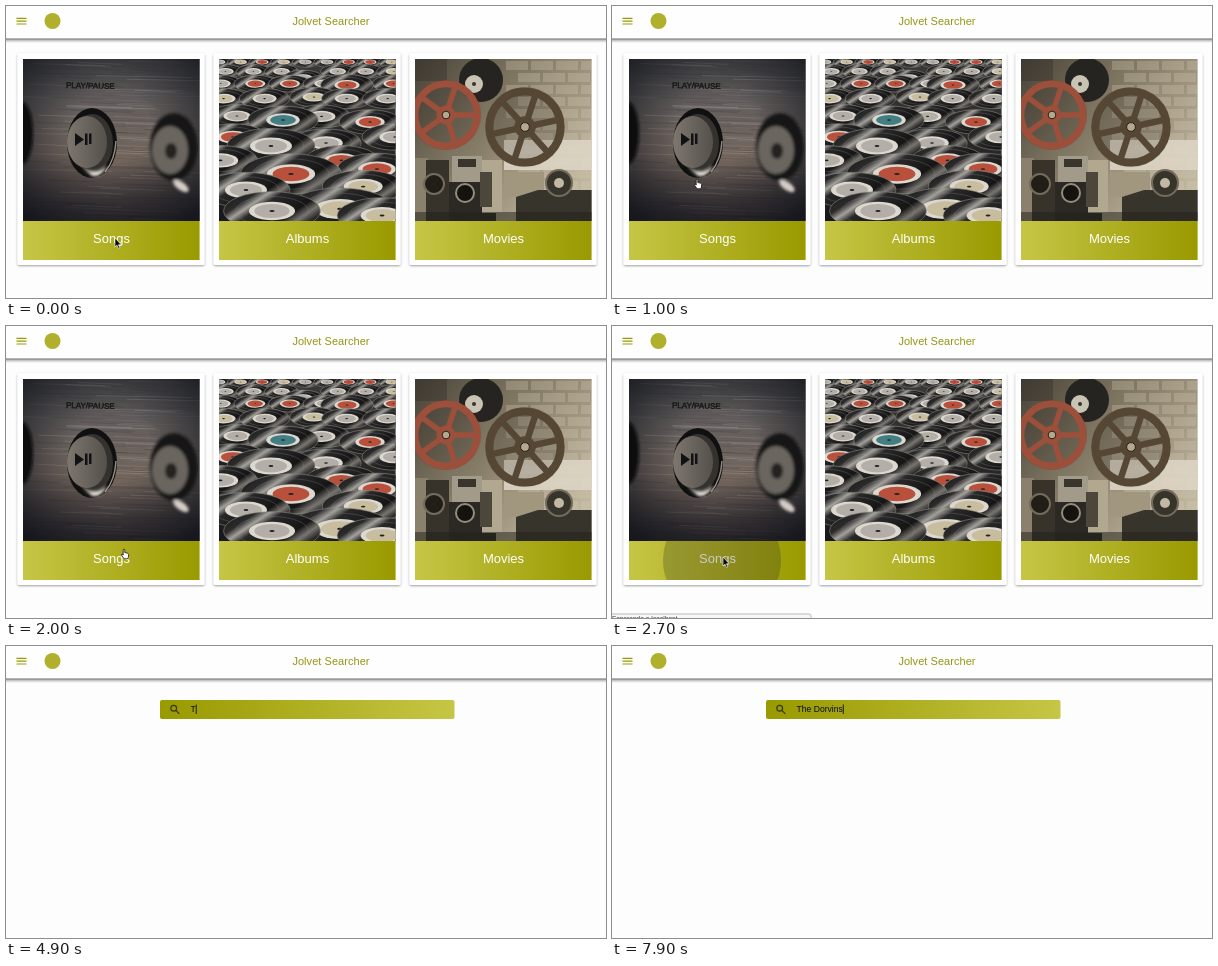
Animation of 600 by 292 pixels, one loop 8 s. Source, as an HTML page:

```html
<!DOCTYPE html>
<html lang="en">
<head>
<meta charset="utf-8">
<title>Media search</title>
<style>
html, body { margin: 0; width: 100%; height: 100%; overflow: hidden; background: #fdfdfd; }
svg { font-family: "Liberation Sans", Arial, sans-serif; }
#stage { display: block; width: 100vw; height: 100vh; }
</style>
</head>
<body>
<svg id="stage" viewBox="0 0 600 292">
  <defs>
    <linearGradient id="button"><stop stop-color="#c6c646"/><stop offset="1" stop-color="#999900"/></linearGradient>
    <linearGradient id="bar"><stop stop-color="#999900"/><stop offset="1" stop-color="#c6c646"/></linearGradient>
    <linearGradient id="drop" x2="0" y2="1"><stop stop-color="#c4c4c4"/><stop offset=".28" stop-color="#969696"/><stop offset=".55" stop-color="#d0d0d0"/><stop offset="1" stop-color="#fdfdfd"/></linearGradient>
    <linearGradient id="metal" x2="0" y2="1"><stop stop-color="#4b4a4c"/><stop offset=".25" stop-color="#625d5c"/><stop offset=".6" stop-color="#75685f"/><stop offset="1" stop-color="#41383a"/></linearGradient>
    <radialGradient id="vignette" cx=".5" cy=".42" r=".72"><stop offset=".3" stop-color="#11141b" stop-opacity="0"/><stop offset="1" stop-color="#11141b" stop-opacity=".9"/></radialGradient>
    <linearGradient id="knob"><stop stop-color="#7d776f"/><stop offset="1" stop-color="#55504a"/></linearGradient>
    <linearGradient id="floor" x2="0" y2="1"><stop stop-color="#3c3a37"/><stop offset="1" stop-color="#191919"/></linearGradient>
    <linearGradient id="disc" x2="1" y2=".6"><stop stop-color="#151515"/><stop offset=".26" stop-color="#2b2b2b"/><stop offset=".36" stop-color="#a5a29c"/><stop offset=".46" stop-color="#282828"/><stop offset=".76" stop-color="#151515"/><stop offset=".88" stop-color="#77746f"/><stop offset="1" stop-color="#202020"/></linearGradient>
    <linearGradient id="wall" x2="1" y2=".7"><stop stop-color="#484338"/><stop offset=".4" stop-color="#7b725f"/><stop offset="1" stop-color="#c0b59d"/></linearGradient>
    <filter id="soft"><feGaussianBlur stdDeviation="1.6"/></filter>
    <filter id="shade" x="-10%" y="-10%" width="120%" height="120%"><feDropShadow dx="0" dy="1" stdDeviation="1.1" flood-opacity=".38"/></filter>
    <clipPath id="songsButton"><path d="M17 215H193.600V254H17Z"/></clipPath>
  </defs>
  <rect width="600" height="292" fill="#fdfdfd"/>

  <g id="home">
    <g id="cards"></g>
    <svg x="17" y="53" width="176.600" height="162" viewBox="17 53 176.600 162">
      <path d="M17 53H194V215H17Z" fill="url(#metal)"/>
      <g id="brushed" stroke-width="1"></g>
      <path d="M17 53H194V215H17Z" fill="url(#vignette)"/>
      <g filter="url(#soft)">
        <ellipse cx="16" cy="127" rx="11" ry="31" fill="#0b0b0c"/>
        <ellipse cx="168" cy="141" rx="24" ry="34" fill="#151415"/>
        <ellipse cx="164" cy="144" rx="18" ry="24" fill="#6a655f"/>
        <ellipse cx="165" cy="145" rx="6" ry="8" fill="#262423"/>
        <ellipse cx="175" cy="180" rx="9" ry="4" fill="#d5cec7" transform="rotate(35 175 180)"/>
      </g>
      <ellipse cx="86" cy="137" rx="25" ry="35" fill="#111011"/>
      <path d="M99 166Q109 154 110 135" fill="none" stroke="#8e8780" stroke-width="1.500"/>
      <ellipse cx="86" cy="137" rx="21" ry="29" fill="#35312e"/>
      <ellipse cx="81" cy="136" rx="20" ry="26" fill="url(#knob)"/>
      <path d="M77 162Q90 170 101 159Q96 172 86 170Z" fill="#e0dad2" filter="url(#soft)"/>
      <path d="M69 127L78 133.500 69 140ZM79 127.500H81.500V139H79ZM83 127.500H85.500V138H83Z" fill="#121212"/>
      <text x="60" y="82" font-size="8" fill="#171717" stroke="#171717" stroke-width=".4" transform="rotate(1 60 82)">PLAY/PAUSE</text>
    </svg>
    <svg x="213" y="53" width="176.600" height="162" viewBox="213 53 176.600 162">
      <path d="M213 53H390V215H213Z" fill="url(#floor)"/>
      <g id="records"></g>
    </svg>
    <svg x="409" y="53" width="176.600" height="162" viewBox="409 53 176.600 162">
      <path d="M409 53H586V215H409Z" fill="url(#wall)"/>
      <g id="bricks" fill="#d3c9b4" opacity=".3"></g>
      <path d="M498 134H586V164H498Z" fill="#e0d8c8" opacity=".85"/>
      <path d="M409 53H441V75H409Z" fill="#322f28" opacity=".4"/>
      <circle cx="475" cy="74" r="22" fill="#252420"/>
      <circle cx="468" cy="78" r="9" fill="#c9c3b4"/>
      <circle cx="468" cy="78" r="2" fill="#37342d"/>
      <g id="reels" fill="none"></g>
      <path d="M409 152H422V215H409Z" fill="#8a806c"/>
      <path d="M420 154H443V215H420Z" fill="#37332b"/>
      <path d="M446 150H476V178H446Z" fill="#a39b89"/>
      <path d="M452 153H470V161H452Z" fill="#3a352c"/>
      <path d="M443 176H490V215H443Z" fill="#2b2924"/>
      <path d="M476 154H496V207H476Z" fill="#b2a78f"/>
      <path d="M474 166H486V201H474Z" fill="#4d473b"/>
      <circle cx="459" cy="187" r="9" fill="#14130f" stroke="#958d7b" stroke-width="2"/>
      <circle cx="428" cy="178" r="10" fill="#211e18" stroke="#746c5b" stroke-width="2"/>
      <path d="M498 166H538V191H498Z" fill="#a1967e"/>
      <path d="M510 191L532 184H586V215H510Z" fill="#37342c"/>
      <circle cx="553" cy="177" r="13" fill="#37342c" stroke="#746b5a" stroke-width="2"/>
      <circle cx="553" cy="177" r="5" fill="#c2b8a3"/>
      <path d="M409 206H586V215H409Z" fill="#23201a" opacity=".5"/>
    </svg>
    <circle id="ripple" cx="110" cy="234" fill="#222" opacity=".23" clip-path="url(#songsButton)"/>
    <g id="status">
      <path d="M-1 288H197Q199 288 199 290V293H-1Z" fill="#f7f7f7" stroke="#aaa" stroke-width=".8"/>
      <text x="0" y="295" font-size="6.600" fill="#444">Esperando a localhost…</text>
    </g>
  </g>

  <g id="search">
    <rect x="154" y="54" width="294.500" height="19" rx="2" fill="url(#bar)"/>
    <g fill="none" stroke="#38380c" stroke-width="1.200">
      <circle cx="167.700" cy="62.200" r="2.900"/>
      <path d="M169.900 64.400L173.300 67.800"/>
    </g>
    <text id="query" x="184.500" y="66.200" font-size="8.600" xml:space="preserve"></text>
    <path id="caret" d="M0 58.500V68" stroke="#111" stroke-width=".9"/>
  </g>

  <rect y="32" width="600" height="5" fill="url(#drop)"/>
  <rect width="600" height="32" fill="#fefefe"/>
  <path d="M10.500 12.300H20.500M10.500 15.200H20.500M10.500 18H20.500" stroke="#999900" stroke-width="1.200"/>
  <circle cx="46.500" cy="15" r="8" fill="#b0b02c"/>
  <text x="325" y="18.600" font-size="11" text-anchor="middle" fill="#999513" letter-spacing=".05">Jolvet Searcher</text>

  <g id="cursor">
    <path id="arrow" d="M0 0V9L2 7.200 3.400 10.400 4.800 9.800 3.400 6.700H6.200Z" fill="#080808" stroke="#fff" stroke-width=".6"/>
    <path id="hand" d="M-.8 4.800V1.200Q-.8 .2 0 .2T.8 1.200V3.600Q4.800 3.800 4.600 5.400V7Q4.400 8.600 3.600 9.800H.2Q-.8 8.400 -2.400 6.200Q-2.800 5 -1.800 5.200L-.8 6Z" fill="#fff" stroke="#111" stroke-width=".8"/>
    <path id="beam" d="M-1.500 -4.500Q0 -4.500 0 -3.500Q0 -4.500 1.500 -4.500M0 -3.500V3.500M-1.500 4.500Q0 4.500 0 3.500Q0 4.500 1.500 4.500" fill="none" stroke="#111" stroke-width=".7"/>
  </g>
</svg>
<script>
const LOOP = 8000, STEP = 100;
const CLICK = 2500, PAGE_CHANGE = 3000, FOCUS = 4300;
const QUERY = "The Dorvins";
const KEY_TIMES = [4900, 5150, 5350, 5600, 6000, 6450, 6700, 6950, 7150, 7350, 7600];
const PATH = [
  [0, 109, 232], [250, 109, 230], [1000, 85, 173], [1300, 86, 176],
  [2000, 118, 223], [2400, 111, 231], [3300, 111, 231],
  [3600, 168, 144], [3700, 200.5, 88], [3900, 226, 63], [LOOP, 226, 63]
];
const $ = id => document.getElementById(id);
const show = (id, on) => $(id).setAttribute("display", on ? "inline" : "none");

function seeded(seed) {
  return () => (seed = (seed * 16807) % 2147483647) / 2147483647;
}

function buildCards() {
  $("cards").innerHTML = ["Songs", "Albums", "Movies"].map((name, i) => `
    <g transform="translate(${i * 196})">
      <rect x="11.5" y="47" width="187" height="212" rx="2" fill="#fff" filter="url(#shade)"/>
      <rect x="17" y="215" width="176.600" height="39" fill="url(#button)"/>
      <text x="105.500" y="237" font-size="13" text-anchor="middle" fill="#fff">${name}</text>
    </g>`).join("");
}

function buildBrushed() {
  const random = seeded(11);
  let lines = "";
  for (let y = 54; y < 215; y += 1.2) {
    const x = 10 + random() * 130, tone = random() < .5 ? "#fff" : "#000";
    lines += `<path d="M${x} ${y}l${30 + random() * 70} 2" stroke="${tone}" opacity="${random() * .16}"/>`;
  }
  $("brushed").innerHTML = lines;
}

function record(x, y, r, color) {
  const ring = (scale, attrs) =>
    `<ellipse cx="${x}" cy="${y}" rx="${r * scale}" ry="${r * scale * .4}" ${attrs}/>`;
  return ring(2.2, 'fill="url(#disc)" stroke="#8c8982" stroke-width=".6"') +
    ring(1.65, 'fill="none" stroke="#888" stroke-width=".3"') +
    ring(1.05, 'fill="#dcd8d0"') + ring(.8, `fill="${color}"`) + ring(.12, 'fill="#222"');
}

function buildRecords() {
  const red = "#b9503c", teal = "#417f85", cream = "#c9bda0", gray = "#b3afa8";
  const labels = [
    [297, 72, 9, gray], [341, 79, 12, red], [308, 91, 11, cream], [364, 116, 14, red],
    [277, 114, 16, teal], [265, 140, 20, gray], [320, 137, 16, gray], [285, 168, 23, red],
    [371, 163, 18, red], [240, 184, 20, gray], [334, 203, 24, cream], [231, 110, 13, gray],
    [266, 205, 22, gray]
  ];
  const random = seeded(23), tones = [gray, cream, red, gray];
  for (let row = 0; row < 9; row++) {
    const y = 56 + row * 8 + row * row * 1.4, r = 6 + row * 1.8;
    for (let x = 213 + random() * r; x < 400; x += r * 3.6) {
      const clear = labels.every(p => Math.hypot(p[0] - x, (p[1] - y) * 2) > p[2] * 1.8);
      if (clear) labels.push([x, y, r, tones[Math.floor(random() * 4)]]);
    }
  }
  labels.sort((a, b) => a[1] - b[1]);
  $("records").innerHTML = labels.map(p => record(...p)).join("");
}

function reel(x, y, r, color, spokes) {
  let arms = "";
  for (let i = 0; i < spokes; i++) {
    arms += `<path transform="rotate(${i * 360 / spokes + 18})" d="M0 0V${-r * .88}" stroke-width="${r * .16}"/>`;
  }
  return `<g transform="translate(${x} ${y})" stroke="${color}">
    <circle r="${r}" fill="#1e1a14" fill-opacity=".18" stroke="none"/>
    <circle r="${r * .89}" stroke-width="${r * .2}"/>${arms}
    <circle r="${r * .26}" fill="${color}"/>
    <circle r="${r * .11}" fill="#b4a88f" stroke="#26231d"/></g>`;
}

function buildProjector() {
  let bricks = "";
  for (let row = 0; row < 11; row++)
    for (let x = 500 + row % 2 * 12; x < 586; x += 25)
      bricks += `<rect x="${x}" y="${55 + row * 12}" width="22" height="9"/>`;
  $("bricks").innerHTML = bricks;
  $("reels").innerHTML = reel(440, 109, 35, "#9c4f3a", 5) + reel(519, 121, 40, "#554733", 6);
}

function cursorAt(t) {
  const i = PATH.findIndex(p => p[0] > t);
  const [t0, x0, y0] = PATH[i - 1], [t1, x1, y1] = PATH[i];
  const k = (t - t0) / (t1 - t0);
  return [x0 + (x1 - x0) * k, y0 + (y1 - y0) * k];
}

function drawCursor(t) {
  const [x, y] = cursorAt(t);
  $("cursor").setAttribute("transform", `translate(${x} ${y})`);
  const hand = t >= 200 && t < 2400, beam = t >= 3900;
  show("hand", hand);
  show("beam", beam);
  show("arrow", !hand && !beam);
  show("cursor", t < KEY_TIMES[0]);
}

function drawSearch(t) {
  const count = KEY_TIMES.filter(time => time <= t).length;
  const query = $("query");
  query.textContent = count ? QUERY.slice(0, count) : "Search…";
  query.setAttribute("fill", count ? "#080808" : "#55550f");
  const width = count ? query.getComputedTextLength() : 0;
  const lastInput = count ? KEY_TIMES[count - 1] : FOCUS;
  $("caret").setAttribute("transform", `translate(${185 + width})`);
  show("caret", t >= FOCUS && (t - lastInput) % 1000 < 500);
}

function draw(t) {
  const home = t < PAGE_CHANGE;
  show("home", home);
  show("search", !home);
  show("status", t >= 2700);
  const grow = Math.min(1, Math.max(0, (t - CLICK) / 500));
  $("ripple").setAttribute("r", 95 * (1 - (1 - grow) ** 1.9));
  if (!home) drawSearch(t);
  drawCursor(t);
}

buildCards();
buildBrushed();
buildRecords();
buildProjector();

const start = performance.now();
function tick() {
  const t = (performance.now() - start) % LOOP;
  draw(Math.floor(t / STEP) * STEP);
  requestAnimationFrame(tick);
}
tick();
</script>
</body>
</html>
```
